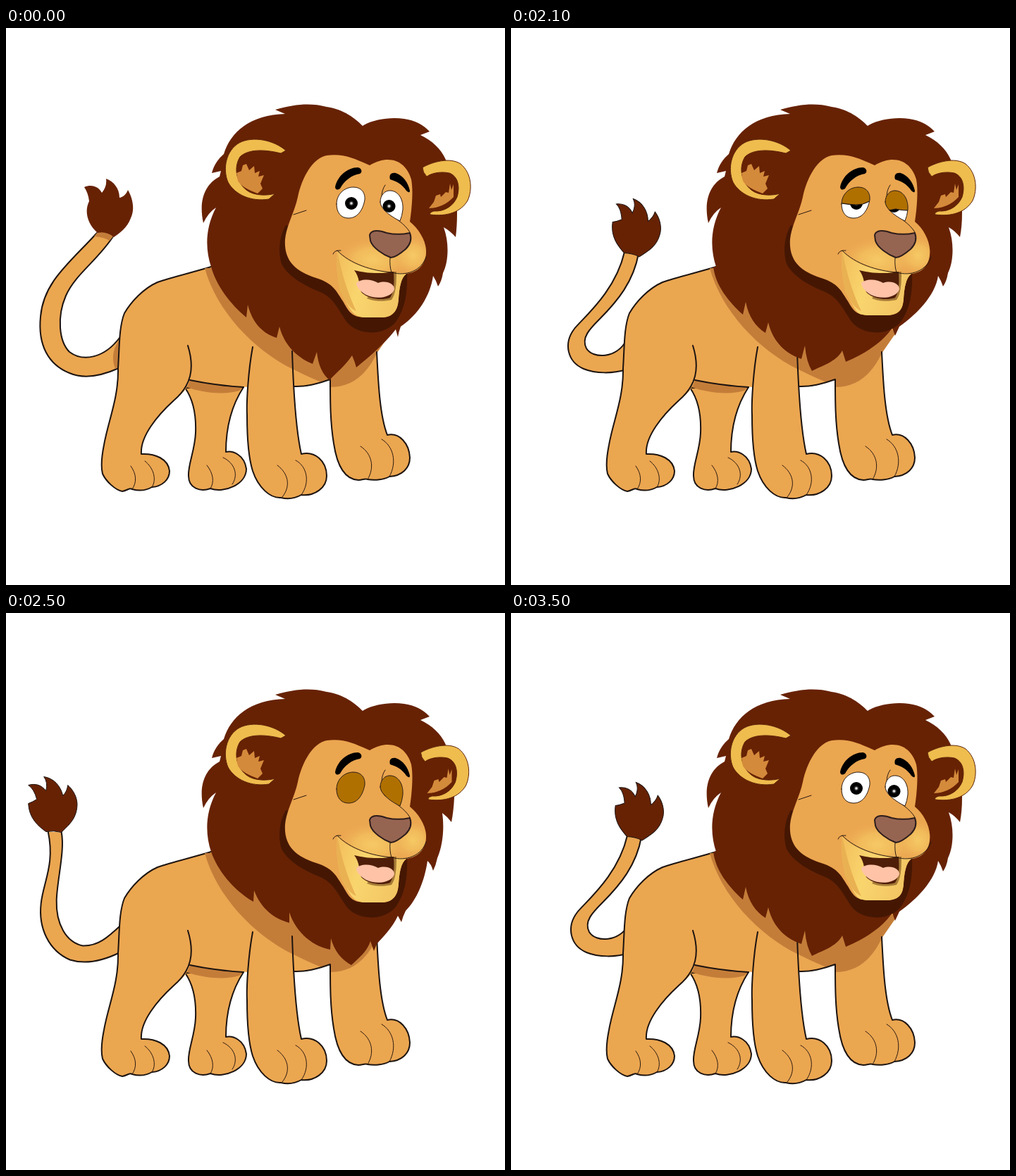
Animation, 708 px wide and 791 px high, one loop 3.7 s. Source, as an HTML page:

```html
<!DOCTYPE html>
<html lang="en">
<head>
<meta charset="utf-8">
<title>Lion</title>
<style>
html, body { margin: 0; width: 100%; height: 100%; overflow: hidden; background: #fff; }
svg { display: block; width: 100%; height: 100%; }
.fur { fill: #eba650; }
.line { fill: none; stroke: #1d1410; stroke-width: 2; stroke-linecap: round; stroke-linejoin: round; }
.thin { fill: none; stroke: #2a1a10; stroke-width: 1; stroke-linecap: round; }
.ink { stroke: #1d1410; stroke-width: 2; stroke-linejoin: round; }
.shade { fill: #c47d39; }
.mane { fill: #672204; }
.ear { fill: #efbc4e; stroke: #5c2208; stroke-width: 1; }
.inner { fill: #d48a3b; }
</style>
</head>
<body>
<svg viewBox="0 0 708 791" xmlns="http://www.w3.org/2000/svg">
<defs>
  <radialGradient id="glow">
    <stop offset="0" stop-color="#f8d069" stop-opacity=".85"/>
    <stop offset=".45" stop-color="#f6c963" stop-opacity=".6"/>
    <stop offset="1" stop-color="#eba650" stop-opacity="0"/>
  </radialGradient>
  <linearGradient id="chin" x1="0" x2="1" y1="0" y2=".3">
    <stop offset="0" stop-color="#f2bd5b"/>
    <stop offset=".45" stop-color="#f9d56e"/>
    <stop offset="1" stop-color="#f3c663"/>
  </linearGradient>
  <radialGradient id="pupil">
    <stop offset="0" stop-color="#fff"/>
    <stop offset=".13" stop-color="#ccc"/>
    <stop offset=".3" stop-color="#222"/>
    <stop offset=".5" stop-color="#000"/>
  </radialGradient>
  <clipPath id="faceClip"><path id="faceEdge"/></clipPath>
  <clipPath id="leftClip"><path class="leftEye"/></clipPath>
  <clipPath id="rightClip"><path class="rightEye"/></clipPath>
</defs>

<g id="tail">
  <path id="tailFill" class="fur"/>
  <path id="tailLine" class="line"/>
  <path id="tailShade" class="shade"/>
  <path id="tuft" class="mane"/>
</g>

<g id="body">
  <path class="fur ink" d="M254,511C266,528 270,550 269,575C268,600 258,620 259,636C259,654 276,659 290,654C310,661 341,648 341,626C338,606 322,600 312,602C312,560 324,530 337,510Z"/>
  <path class="shade" d="M256,506L261,500Q300,508 337,509L331,515C312,521 282,519 256,510Z"/>
  <path class="fur" d="M291,339C265,347 235,354 215,361C195,370 178,388 168,405C160,425 161,455 159,483C160,525 145,558 139,592C135,612 135,625 137,633C142,644 155,656 165,658C172,657 176,652 179,655C190,658 200,656 207,652C222,651 232,641 232,629C230,612 212,604 192,605C190,580 215,550 238,529C248,521 257,514 261,500Q300,508 345,510L408,509C430,510 447,503 460,499L526,460L546,433L520,350Z"/>
  <path class="line" d="M291,339C265,347 235,354 215,361C195,370 178,388 168,405C160,425 161,455 159,483C160,525 145,558 139,592C135,612 135,625 137,633C142,644 155,656 165,658C172,657 176,652 179,655C190,658 200,656 207,652C222,651 232,641 232,629C230,612 212,604 192,605C190,580 215,550 238,529C263,508 268,483 258,451M261,500Q300,508 337,510"/>
  <path class="fur" d="M460,499C460,530 460,560 465,590C469,617 479,641 500,642C506,642 510,639 513,641C524,643 537,641 544,637C562,636 573,625 573,610C572,590 558,574 541,578C530,550 528,500 526,460Z"/>
  <path class="fur" d="M350,453C344,485 341,530 342,550C342,582 344,610 350,629C358,653 375,668 390,667C402,670 412,667 419,663C438,665 455,653 455,636C455,615 438,600 419,605C411,570 408,520 406,459Z"/>
  <path class="shade" d="M282,341C298,400 350,457 408,485C428,495 442,501 448,503L460,499V510C492,510 513,490 526,462L546,433L440,340Z"/>
  <path class="line" d="M350,453C344,485 341,530 342,550C342,582 344,610 350,629C358,653 375,668 390,667C402,670 412,667 419,663C438,665 455,653 455,636C455,615 438,600 419,605C411,570 408,520 406,459M408,509C430,510 447,503 460,499C460,530 460,560 465,590C469,617 479,641 500,642C506,642 510,639 513,641C524,643 537,641 544,637C562,636 573,625 573,610C572,590 558,574 541,578C530,550 528,500 526,460"/>
  <path class="thin" d="M177,622C185,633 186,645 179,655M197,615C210,625 214,642 207,652M285,621C294,632 296,645 290,654M308,610C325,618 330,635 321,648M385,621C400,632 405,650 392,666M411,614C427,622 432,645 419,663M503,594C520,605 523,625 513,641M533,584C550,594 555,617 544,637"/>
</g>

<path id="mane" class="mane"/>
<path fill="#451703" d="M397,280C385,300 387,327 392,337C403,355 424,366 446,375C466,384 471,400 484,418C500,437 538,438 554,416C567,396 570,375 569,345L520,320Z"/>
<path id="face" class="fur"/>

<g id="leftEar">
  <path class="ear" d="M397,174C380,159 350,153 331,163C312,174 307,200 315,219C325,237 348,247 373,243L382,235C372,238 352,239 341,230C326,218 323,198 332,183C343,172 366,172 390,178Z"/>
  <path class="inner" d="M327,206L334,203L336,195L341,193L345,202L352,196L353,206L360,203L358,211L366,209L361,221L364,228L357,235C346,231 332,224 329,217Z"/>
</g>
<g id="rightEar">
  <path class="mane" d="M596,205C630,192 652,205 650,235C645,258 625,264 604,262Z"/>
  <path class="ear" d="M591,198C605,190 630,183 645,193C661,206 662,230 655,245C645,262 625,268 602,265Q600,262 607,260C623,261 635,252 640,240C645,223 640,210 629,206C615,203 602,207 597,211Q591,205 591,198Z"/>
  <path class="inner" d="M600,256L607,247L610,238L616,236L617,240L624,233L628,234L630,221L632,230L635,222L635,240C626,250 613,256 600,256Z"/>
</g>

<g clip-path="url(#faceClip)">
  <ellipse cx="577" cy="323" rx="33" ry="31" fill="url(#glow)"/>
  <ellipse cx="520" cy="329" rx="56" ry="34" fill="url(#glow)"/>
  <path fill="url(#chin)" d="M470,317C490,338 520,346 547,347L568,349C558,365 558,385 555,400C550,413 540,411 510,411C492,411 488,398 480,385C470,365 468,340 470,317Z"/>
  <path fill="#e9b152" d="M470,317C475,340 481,368 497,402C486,398 479,383 474,374Q467,345 470,317Z"/>
</g>
<path fill="#8d6029" opacity=".75" d="M543,346L554,346C554,365 553,377 547,386C535,389 520,388 512,384Z"/>
<path fill="#4f1e08" d="M494,344C515,349 535,349 550,346C551,360 551,374 545,383C530,388 511,383 504,375C501,366 502,354 494,344Z"/>
<path fill="#ffc3a7" d="M497,362C505,355 520,357 528,362C540,358 551,363 551,371C546,385 522,385 511,379C502,374 497,367 497,362Z"/>
<path class="thin" d="M464,321Q466,315 475,316M470,316C488,335 520,345 547,347M545,326Q544,338 547,347C567,353 590,345 596,325M408,265L426,259M538,223Q533,230 533,240M537,259C552,270 566,278 573,290"/>
<path fill="#966552" stroke="#2d1d1b" stroke-width="2" stroke-linejoin="round" d="M516,294C518,286 530,287 540,291C553,294 564,293 573,291C576,299 575,306 567,314C560,320 551,326 546,326C535,322 520,312 517,302Z"/>

<g id="eyes">
  <path class="leftEye" fill="#fff"/>
  <path class="rightEye" fill="#fff"/>
  <g id="pupils">
    <circle cx="490" cy="249" r="9" fill="url(#pupil)"/>
    <circle cx="543.5" cy="253" r="9" fill="url(#pupil)"/>
  </g>
  <g fill="#b07000" stroke="#1d1410" stroke-width="1.2">
    <path id="leftLid" clip-path="url(#leftClip)"/>
    <path id="rightLid" clip-path="url(#rightClip)"/>
  </g>
  <path class="leftEye thin"/>
  <path class="rightEye thin"/>
</g>
<path d="M467,226C470,210 485,198 499,198C505,199 506,205 502,207C490,209 480,217 474,228Q468,232 467,226Z"/>
<path d="M545,215C543,208 547,205 553,206C563,209 571,220 573,231C573,235 570,233 568,231C562,222 555,218 545,215Z"/>
</svg>

<script>
const $ = id => document.getElementById(id);
const put = (id, name, value) => $(id).setAttribute(name, value);

const eyes = {
  leftEye: "M469,250C469,236 480,226 493,226C505,226 510,235 509,244C506,260 498,270 486,270C475,270 469,262 469,250Z",
  rightEye: "M531,247C531,237 538,230 546,231C558,232 564,245 563,258Q562,267 559,274C550,270 531,258 531,247Z"
};
for (const name in eyes)
  document.querySelectorAll("." + name).forEach(e => e.setAttribute("d", eyes[name]));

const maneTop = "M291,339C283,315 282,285 298,255Q287,262 280,277C273,245 282,222 303,211L305,203L292,206C295,194 302,185 309,179C318,148 347,123 396,122L382,116C410,108 432,106 455,112C480,116 495,128 506,139C520,130 545,126 565,129Q587,132 601,147L588,152C605,160 617,172 623,185";

const manes = {
  mid: "C632,205 640,240 640,262Q640,282 638,297Q630,288 621,283C629,305 628,332 620,348Q618,360 613,367Q610,358 606,352C602,380 585,407 560,424Q557,432 556,439L553,428C540,445 515,468 497,482Q495,474 491,465C483,478 468,490 459,500Q444,488 441,460L435,477C418,470 396,455 388,424L384,440C365,434 350,420 343,393L341,411C318,392 298,365 291,339Z",
  left: "C632,205 638,240 636,262Q635,282 632,297Q626,289 619,284C622,305 620,330 612,348Q610,358 606,366Q603,356 598,352C594,380 583,407 567,423Q563,431 561,439L556,430C548,447 536,459 526,470L522,480L517,466C512,482 500,490 490,500Q468,488 461,462L460,478C438,474 412,456 402,425L402,440C380,434 362,420 352,394L351,410C322,393 300,365 291,339Z",
  right: "C632,205 640,240 640,262Q640,282 637,297Q630,288 621,283C629,305 628,332 620,348Q618,360 613,367Q610,358 606,352C602,380 575,407 551,424L545,437L541,426C527,446 505,461 475,474L470,458C462,474 440,480 427,487Q419,474 417,451L412,470C392,463 372,448 365,418L361,433C347,424 337,410 333,389L329,407C308,388 290,365 287,339Z"
};

const tuftMid = "M130,291C115,278 111,260 118,246C117,238 115,232 111,226C122,221 132,226 136,234C141,228 143,222 142,214C153,218 161,228 161,241C167,240 171,235 173,230C180,242 183,258 177,270C172,284 160,292 153,297C146,291 138,289 130,291Z";
const tuftSide = "M56,313C45,305 32,294 31,273Q37,271 43,267Q39,252 31,247C41,244 50,247 56,255Q59,243 53,235C67,237 77,248 80,262Q86,256 87,247C94,253 102,265 100,279C98,298 84,307 78,314Q67,311 56,313Z";

// Each tail edge runs from the body to the tuft, then back.
const tails = {
  mid: {
    out: "M160,483C140,492 113,500 90,490C60,478 45,450 49,410C53,360 92,332 129,291",
    back: "152,296C130,330 98,350 85,380C72,410 75,445 90,460C110,475 140,468 161,440",
    tuft: tuftMid, spin: ""
  },
  left: {
    out: "M162,484C140,495 115,503 90,495C60,482 45,450 49,415C52,385 69,360 59,313",
    back: "78,314C83,340 72,380 71,410C70,445 85,470 108,475C130,476 145,462 162,446",
    tuft: tuftSide, spin: ""
  },
  right: {
    out: "M163,485C145,491 120,491 103,484C80,474 74,448 90,427C102,412 148,375 161,318",
    back: "181,320C174,360 151,388 126,413C112,427 99,440 107,455C116,470 150,470 164,443",
    tuft: tuftSide, spin: "translate(172.5 322) rotate(11.5) translate(-68 -313)"
  }
};

const lids = {
  open: ["", ""],
  half: ["M460,215H520V240Q508,247 499,250Q485,253 460,247Z", "M522,222H575V258Q556,260 546,257Q536,260 522,258Z"],
  shut: ["M460,215H520V280H460Z", "M522,222H575V284H522Z"]
};

// start, pose, eyelids, tail offset
const poses = [
  [0, "mid", "open", 0, 0],
  [1700, "left", "half", 0, 0],
  [1900, "mid", "open", 0, 0],
  [2100, "right", "half", 0, 0],
  [2300, "mid", "open", 0, 0],
  [2500, "left", "shut", 0.7, -2.5],
  [2900, "mid", "open", 0, 0],
  [3300, "right", "half", 4, -2],
  [3500, "right", "open", 4, -2]
];
const LOOP = 3700;

function faceShape(lift) {
  const low = 411 - lift, side = 596 - lift * 0.6;
  return `M516,195C500,188 480,177 455,181C435,185 420,212 414,240C410,260 398,280 396,300C394,330 410,345 440,355C465,363 468,373 478,388C486,402 490,${low} 510,${low}L535,${low}C550,${low - 1} 556,400 557,385C558,370 560,355 568,349C585,347 ${side + 1},335 ${side},315C${side - 1},300 585,285 573,275C576,255 578,230 575,215C568,190 545,178 516,195Z`;
}

function draw(ms) {
  const [, pose, lid, dx, dy] = poses.filter(p => p[0] <= ms).pop();
  const tail = tails[pose];
  const mid = pose === "mid";
  const face = faceShape(pose === "right" ? 3 : 0);

  put("tail", "transform", `translate(${dx} ${dy})`);
  put("tailFill", "d", tail.out + "L" + tail.back + "Z");
  put("tailLine", "d", tail.out + "M" + tail.back);
  put("tailShade", "d", mid ? "M129,291Q141,286 152,296L147,302Q139,297 125,296ZM160,444Q147,463 155,484L160,482Z" : "");
  put("tuft", "d", tail.tuft);
  put("tuft", "transform", tail.spin);
  put("tuft", "stroke", mid ? "none" : "#1d1410");

  put("mane", "d", maneTop + manes[pose]);
  put("face", "d", face);
  put("faceEdge", "d", face);
  put("rightEar", "transform", `translate(${pose === "left" ? -2.5 : 0} 0)`);

  put("leftLid", "d", lids[lid][0]);
  put("rightLid", "d", lids[lid][1]);
}

const start = performance.now();
function tick() {
  draw((performance.now() - start) % LOOP);
  requestAnimationFrame(tick);
}
tick();
</script>
</body>
</html>
```
